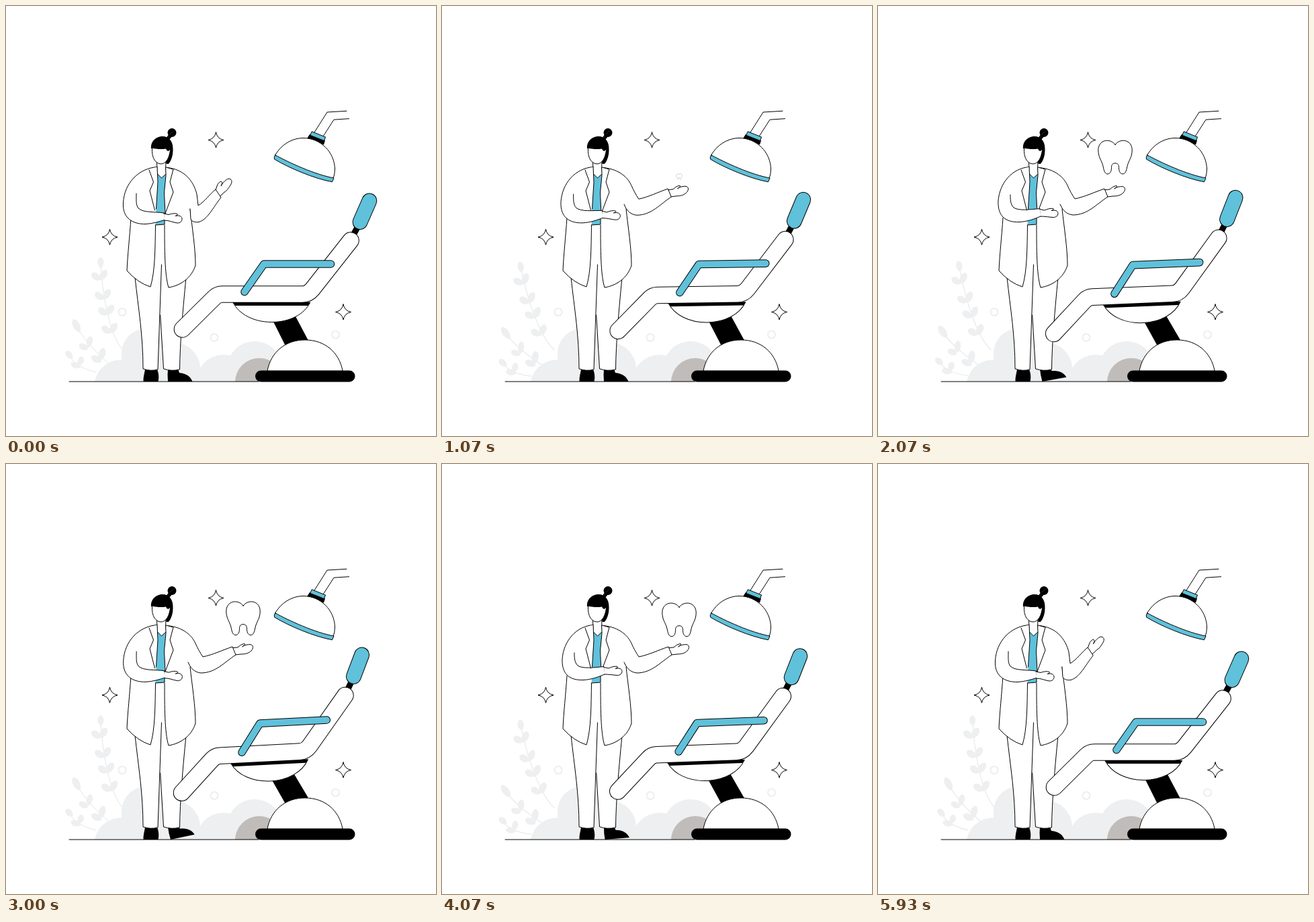
Animation of 640 by 640 pixels, one loop 6000 ms. Source, as an HTML page with a canvas:

```html
<!DOCTYPE html>
<html lang="en">
<head>
<meta charset="utf-8">
<title>Dentist and chair</title>
<style>
html, body { margin: 0; width: 100%; height: 100%; overflow: hidden; background: #fff; }
canvas { display: block; width: 640px; height: 640px; }
</style>
</head>
<body>
<canvas id="stage" width="640" height="640"></canvas>
<script>
const ctx = document.getElementById('stage').getContext('2d');
const LOOP = 6;
const INK = '#000', TEAL = '#60c1da', PALE = '#eeeff0', STEM = '#e5e6e8', TAUPE = '#c0bcb9';

// Motion helpers, all in seconds
const ramp = (t, a, b) => {
  const k = Math.min(1, Math.max(0, (t - a) / (b - a)));
  return k * k * (3 - 2 * k);
};
const wave = (t, period) => (1 - Math.cos(2 * Math.PI * t / period)) / 2;

// Blend two path strings of the same structure
function mix(a, b, k) {
  const to = b.match(/-?[\d.]+/g);
  let i = 0;
  return a.replace(/-?[\d.]+/g, n => +n + (to[i++] - n) * k);
}

function shape(d, fill, line, width = 1) {
  const p = typeof d === 'string' ? new Path2D(d) : d;
  if (fill) { ctx.fillStyle = fill; ctx.fill(p); }
  if (line) { ctx.strokeStyle = line; ctx.lineWidth = width; ctx.stroke(p); }
}

function disc(x, y, r, fill, line, width) {
  const p = new Path2D();
  p.arc(x, y, r, 0, 7);
  shape(p, fill, line, width);
}

function tube(d, r, fill) {
  shape(d, null, INK, 2 * r + 1);
  shape(d, null, fill, 2 * r - 1);
}

function turned(x, y, angle, draw) {
  ctx.save();
  ctx.translate(x, y);
  ctx.rotate(angle);
  ctx.translate(-x, -y);
  draw();
  ctx.restore();
}

function leaf(x, y, deg, len, wide) {
  ctx.save();
  ctx.translate(x, y);
  ctx.rotate(deg * Math.PI / 180);
  shape(`M0 0 C${len * .25} ${-wide * .7} ${len * .9} ${-wide * .65} ${len} 0
         C${len * .9} ${wide * .65} ${len * .25} ${wide * .7} 0 0Z`, PALE);
  ctx.restore();
}

function plants() {
  shape('M173 511 C159 495 145 450 141 385 M153 532 C135 517 115 495 107 480 M134 545 C120 542 105 535 98 526', null, STEM);
  leaf(141, 390, -91, 16, 9);
  for (const [x, y] of [[140, 408], [145, 437], [150, 460], [155, 487]]) {
    leaf(x, y, -140, 16, 10);
    leaf(x, y, -58, 18, 10);
  }
  leaf(110, 486, -117, 22, 10);
  leaf(122, 511, -152, 15, 9);
  leaf(122, 509, -76, 18, 9);
  leaf(142, 530, -150, 17, 10);
  leaf(140, 528, -74, 20, 10);
  leaf(99, 525, -130, 15, 9);
  leaf(112, 537, -164, 16, 9);
  leaf(109, 535, -72, 14, 9);
}

function backdrop(t) {
  turned(176, 550, -.177 * wave(t, 3), plants);
  ctx.save();
  ctx.beginPath();
  ctx.rect(0, 0, 640, 559);
  ctx.clip();
  disc(171, 566, 39.5, PALE);
  disc(209, 517, 37, PALE);
  disc(250, 540, 39, PALE);
  disc(324, 560, 41, PALE);
  disc(370, 540, 41, PALE);
  shape('M172 517 H250 V559 H172Z M289 540 H370 V559 H260Z', PALE);
  disc(377, 560, 36, TAUPE);
  ctx.restore();
  for (const [x, y] of [[173, 455.5], [310, 493.5], [490.5, 489]]) disc(x, y, 5.5, null, PALE, 2.2);
  shape('M94 559 H376', null, INK);
}

function sparkle(x, y) {
  ctx.save();
  ctx.translate(x, y);
  shape('M0 -11.5 Q1.8 -1.8 11.5 0 Q1.8 1.8 0 11.5 Q-1.8 1.8 -11.5 0 Q-1.8 -1.8 0 -11.5Z', '#fff', INK);
  ctx.restore();
}

function lamp() {
  shape('M507 156.3 L478 158 L459 188 M510.5 167.7 L488 169.2 L472 194', null, INK);
  shape('M452 191 L475 200 L473 206.5 L448 197Z', INK);
  shape('M455.5 187 L475.5 195 L473.5 200.5 L453 192.5Z', TEAL, INK);
  shape('M400 223 C410 205 427 196.5 443 196.5 C468 197 489 217 489.5 243 Q489.5 250 487 257', '#fff', INK);
  shape('M401 222 C421 233 460 251 488 256 L485.5 261.8 C459 257 421 241 399.5 228 Q398 225 401 222Z', TEAL, INK);
}

function legs(t) {
  shape('M207 541 H225 C228 548 227.5 555 226.5 559 H204.5 C204 553 206 547 207 541Z', INK);
  const lift = ramp(t, 1.3, 2.3) - ramp(t, 3.3, 4.65);
  turned(243, 540, -.21 * lift, () =>
    shape('M241 540 H256 L258 546 C269 547 275 552 277.5 559 H241 Q240 549 241 540Z', INK));
  shape('M192 404 C197 450 204 490 204 540 Q215 544 226 541 L229.7 460 L234.5 540 Q246 544 258.5 541 C259 500 263 455 268 404 L231 380Z', '#fff');
  shape('M192 404 C197 450 204 490 204 540 Q215 544 226 541 L231.5 385 M229.7 460 L234.5 540 Q246 544 258.5 541 C259 500 263 455 268 404', null, INK);
}

function head() {
  shape('M224.5 230 V250 L231 257 L238 250 V230Z', '#fff');
  shape('M224.5 232 L225 250 M237.8 232 V249', null, INK);
  shape('M238 197 L243 190 L248 193 L243 199Z', INK);
  disc(247, 188.5, 6.5, INK);
  shape('M244 191 L249 186 M243 194 L240 197', null, '#555', .5);
  shape('M216 212 C215 201 224 194 233 194 C243 194 249 202 248.5 214 C248.5 223 246 230 242 235 L238.5 235 L238 231 L225 214Z', INK);
  shape('M217.5 211.5 C216.5 227 223 235 231 235 C238 235 243.5 226 244.5 213.5 L241.5 216 Q239 215.5 238 212.5 C231 213.5 223 213 217.5 211.5Z', '#fff');
  shape('M217.5 211.5 C216.5 227 223 235 231 235 C238 235 243.5 226 244.5 213.5', null, INK);
}

const rightArm = [
  'M240 240.5 C265 243 279 260 284 280 C285 286 285 291 286 297 C296 291 303 280 312 273 L320 285 C308 300 300 318 287 321.5 C280 322.5 276 320 275 317 L274 302',
  'M240 240.5 C265 243 277 256 282 267 C285 274 289 281 293 287 C308 284 322 277 337 272 L342 284 C325 295 312 311 290 311 C280 310 275 303 273 299 L271 295'
];
const rightHand = [
  'M312 274 L314 268 C315 264 318 262 320 261 C323 262 321 266 320 268 C323 262 328 258 331 257 C336 257 337 261 335 265 C332 270 329 275 325 277 L319 283',
  'M338 273.5 L345 273 C348 270 351 268 355 267.5 C357 268 354 270.5 351.5 272 C355 269 361 268.5 364 268.7 C368.5 269.5 368.5 274.5 365 278 C361 282 356 283 350 283 L341.5 284'
];
const leftArm = [
  'M225 239.5 C197 241.5 176 264 174.5 293 C173 315 188 325 208 324.5 C218 324 228 321 237 318 L235 308 C222 306 204 308 197 301 C193 296 194 288 194 279',
  'M225 239.5 C199 241.5 181 264 179 290 C178 313 190 322 210 321.5 C222 321 233 317 243 312.5 L241 301.5 C226 303 209 305 202 300 C197 295 197 288 197 281'
];
const leftHand = [
  'M235 309 L242 310.5 C246 309 252 308 255 309.5 Q257 311 252 312.5 C258 311 262 313 262 317 C262 321 259 323 255 323 C248 322 243 319 236 319',
  'M241 302.5 L248 304 C252 302 258 300.5 261 301.5 Q263 303 258 304.5 C264 303 268 305 268 308.5 C268 312 265 314.5 261 314.5 C254 314 249 313 242 313'
];

function dentist(t) {
  legs(t);
  head();

  shape('M224 240 L213 244 C198 262 187 300 186 317 C184 345 181 370 180 394 Q196 412 215 418 C222 395 222 360 222.5 326 L226 260Z', '#fff');
  shape('M186 315 C184 345 181 370 180 394 Q196 412 215 418 C222 395 222 360 222.5 326', null, INK);
  shape('M238 240 L249 243 L274 302 C277 330 282 360 282 386 C276 405 260 416 242 419 C236 400 236 360 236 326 V258Z', '#fff');
  shape('M274 302 C277 330 282 360 282 386 C276 405 260 416 242 419 C236 400 236 360 236 326', null, INK);
  shape('M225.5 250 L231.5 256 L238 250 L236 325 L222.5 326Z', TEAL);
  shape('M225.5 250 L231.5 256 L238 250 M236 308 V325 L222.5 326', null, INK);

  const reach = ramp(t, 0, 1.2) - ramp(t, 4.8, 6);
  shape(mix(...rightHand, reach), '#fff', INK);
  shape(mix(...rightArm, reach), '#fff', INK);
  shape('M238 240 L249 243 L244 262 L249 277 L237 309 L235.5 278 L238 252Z', '#fff', INK);

  const sway = t < 2 ? wave(t, 4) : t > 4 ? wave(LOOP - t, 4) : 1 - .95 * wave(t - 2, 2);
  shape(mix(...leftArm, sway), '#fff', INK);
  shape('M225 239.5 L213 244 L219.5 262 L214 275 L221.5 304 L223.5 300 L226 262Z', '#fff');
  shape('M213 244 L219.5 262 L214 275 L221.5 304 M225 239.5 L226 262 L223.5 302', null, INK);
  shape(mix(...leftHand, sway), '#fff', INK);
}

function seat() {
  shape('M398 470 L431 462 L450 498 L416 506Z', INK);
  shape('M338 441.5 C347 459 369 470.5 395.5 470.5 S444 459 452.5 441.5Z', '#fff', INK);
  shape('M337.5 441 H453 L449.5 446 H341.5Z', INK);
  shape('M514 346 L525 326', null, INK, 9);
  tube('M527 321.5 L540.8 290', 11, TEAL);
  tube('M262.5 481 L310 434 Q315 429 322 429 H441 Q450 429 456 421.5 L513 349', 12.3, '#fff');
  tube('M355 425.5 L384 384 H483.5', 5.3, TEAL);
}

function chair(t) {
  turned(422, 503, -.052 * wave(t, LOOP), seat);
  shape('M389 543 C394 515 416 497 445 497 S496 515 501 543Z', '#fff', INK);
  shape('M379.5 551 H511', null, INK, 17);
}

function tooth(t) {
  const size = ramp(t, .85, 1.7) - ramp(t, 4.8, 5.65);
  if (size <= .002) return;
  ctx.save();
  ctx.translate(353, 251 + 7.8 * wave(t - .45, 1.5));
  ctx.scale(size, size);
  ctx.translate(-353, -251);
  shape('M353 206 C347 196.5 329 197 327.8 213 C327.5 225 333 229 335 238 C336.5 246 338 249.5 342 249.5 C346.5 249 347.5 244 347.5 240 C347.5 235.5 349.5 233.5 353 233.5 C356.5 233.5 358.5 235.5 358.5 240 C358.5 244 359.5 249 364 249.5 C368 249.5 369.5 246 371 238 C373 229 378.5 225 378.2 213 C377 197 359 196.5 353 206Z', '#fff', INK);
  ctx.restore();
}

function draw(t) {
  ctx.fillStyle = '#fff';
  ctx.fillRect(0, 0, 640, 640);
  backdrop(t);
  lamp();
  sparkle(312.5, 199.5);
  sparkle(154.5, 344);
  sparkle(502, 455.5);
  dentist(t);
  chair(t);
  tooth(t);
}

ctx.lineCap = ctx.lineJoin = 'round';
let start = null;
function tick(now) {
  if (start === null) start = now;
  draw((now - start) / 1000 % LOOP);
  requestAnimationFrame(tick);
}
draw(0);
requestAnimationFrame(tick);
</script>
</body>
</html>
```
